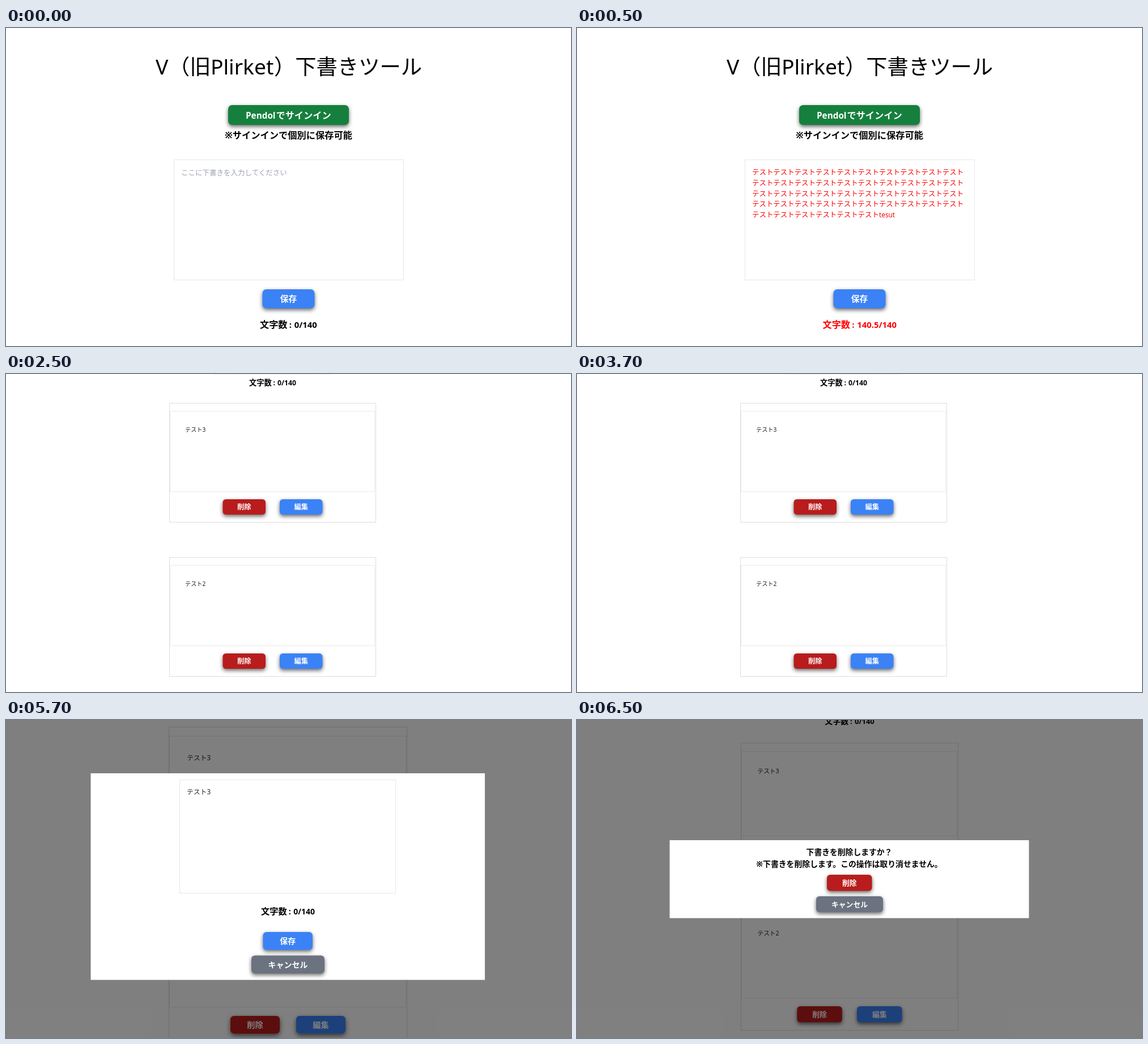
Recreate the animation shown at these times as an HTML page. Size 997x561 px, loop 8000 ms.

```html
<!DOCTYPE html>
<html lang="ja">
<head>
<meta charset="utf-8">
<title>下書きツール</title>
<style>
  html, body { margin: 0; width: 100%; height: 100%; overflow: hidden; background: #fff; }
  svg { display: block; width: 100vw; height: 100vh; }
  text { font-family: "Noto Sans", "Noto Sans CJK JP", "Noto Sans CJK", sans-serif; white-space: pre; }
  .box { fill: #fff; shape-rendering: crispEdges; vector-effect: non-scaling-stroke; }
  .btn { filter: drop-shadow(.5px 3px 3.5px rgba(0, 0, 0, .6)); }
</style>
</head>
<body>
<svg id="stage" viewBox="0 0 997 561" preserveAspectRatio="none"></svg>
<script>
const GREEN = '#15803d', BLUE = '#3b82f6', RED = '#b91c1c', GRAY = '#6b7280';
const LOOP = 8000;

// Text placed by its left (or middle) x and the vertical centre of its line.
const text = (x, cy, size, str, { fill = '#000', weight = 350, anchor = 'start' } = {}) =>
  `<text x="${x}" y="${cy + size * 0.36}" font-size="${size}" fill="${fill}" ` +
  `font-weight="${weight}" text-anchor="${anchor}">${str}</text>`;

const box = (x1, y1, x2, y2, stroke = '#e5e7eb') =>
  `<rect class="box" x="${x1}" y="${y1}" width="${x2 - x1}" height="${y2 - y1}" stroke="${stroke}"/>`;

const button = (x1, y1, x2, y2, fill, size, label = '') => {
  const r = (y2 - y1) * 0.2;
  return `<rect class="btn" x="${x1}" y="${y1}" width="${x2 - x1}" height="${y2 - y1}" rx="${r}" fill="${fill}"/>` +
    text((x1 + x2) / 2, (y1 + y2) / 2 + 0.3, size, label, { fill: '#fff', weight: 700, anchor: 'middle' });
};

const counter = (x, cy, size, value, fill = '#000') =>
  text(x, cy - 0.4, size, '文字数', { fill, weight: 700 }) +
  text(x + size * 3.2, cy, size * 0.92, ':', { fill, weight: 600 }) +
  text(x + size * 3.76, cy, size * 0.92, value + '/140', { fill, weight: 600 });

const group = (body, attrs = '') => `<g ${attrs}>${body}</g>`;

function form(body) {
  return text(264, 68.4, 37.2, 'V') +
    text(287, 68.4, 37.2, '（旧') +
    text(361, 68.4, 37.2, 'Plirket') +
    text(473, 68.4, 37.3, '）下書きツール') +
    button(392, 136, 605, 171, GREEN, 16.2) +
    text(423, 154, 15.3, 'Pendol', { fill: '#fff', weight: 600 }) +
    text(476.5, 154, 16.2, 'でサインイン', { fill: '#fff', weight: 700 }) +
    text(386, 189.5, 16.25, '※サインインで個別に保存可能', { weight: 700 }) +
    box(296.5, 232.5, 701.5, 444.5) +
    body +
    button(452.5, 461, 544.5, 494.5, BLUE, 14.7, '保存');
}

function emptyForm() {
  return form(text(309, 255, 12.5, 'ここに下書きを入力してください', { fill: '#9ca3af' })) +
    counter(448, 523.5, 16.15, '0');
}

function fullForm() {
  const red = { fill: '#f00', weight: 300 };
  let lines = '';
  for (let i = 0; i < 5; i++)
    lines += text(309, 255 + i * 18.65, 12.44, 'テスト'.repeat(i < 4 ? 10 : 6), red);
  lines += text(533, 329.9, 11.8, 'tesut', red);
  return form(lines) + counter(433.5, 523.5, 16.15, '140.5', '#f00');
}

const card = (dy, label) => group(
  box(288.5, 51.5, 652.5, 261.5, '#dedede') +
  box(289.5, 65.5, 650.5, 207.5, '#ebebeb') +
  text(316, 98.5, 10.2, label, { fill: '#222' }) +
  button(382.5, 221, 458, 248, RED, 12.3, '削除') +
  button(483, 221, 558.5, 248, BLUE, 12.3, '編集'),
  `transform="translate(0 ${dy})"`);

function list(x = 0, y = 0, zoom = 1) {
  return group(
    '<path d="M368 .5H574" stroke="#ececec" stroke-dasharray="3 2"/>' +
    counter(429, 15.5, 13.3, '0') + card(0, 'テスト3') + card(272, 'テスト2'),
    `transform="translate(${x} ${y}) scale(${zoom})"`);
}

const modal = (x1, y1, x2, y2) =>
  '<rect width="997" height="561" fill="#000" fill-opacity=".5"/>' +
  `<rect x="${x1}" y="${y1}" width="${x2 - x1}" height="${y2 - y1}" fill="#fff"/>`;

function editModal() {
  return list(-45.4, -46.9, 1.154) +
    modal(149.5, 94, 845, 458.5) +
    box(306.5, 105.5, 687.5, 305.5) +
    text(319, 126.5, 11.8, 'テスト3', { fill: '#222' }) +
    counter(450, 337.5, 15.2, '0') +
    button(453.5, 374, 541, 405.5, BLUE, 14, '保存') +
    button(433, 415.5, 562, 447, GRAY, 14, 'キャンセル');
}

function deleteModal() {
  const bold = { weight: 700, anchor: 'middle' };
  return list(-14, -13.7, 1.052) +
    modal(163.5, 212, 797.5, 349.5) +
    text(480.5, 233, 13.8, '下書きを削除しますか？', bold) +
    text(480.5, 253.7, 13.85, '※下書きを削除します。この操作は取り消せません。', bold) +
    button(441, 273, 520.5, 301.5, RED, 12.8, '削除') +
    button(422, 311, 540, 339, GRAY, 12.8, 'キャンセル');
}

const scenes = [
  [0, emptyForm()],
  [500, fullForm()],
  [2500, list()],
  [4500, editModal()],
  [6500, deleteModal()],
];

const stage = document.getElementById('stage');
stage.innerHTML = scenes.map(([, body]) => group(body, 'display="none"')).join('');
const layers = [...stage.children];
const start = performance.now();
let shown = -1;

function draw() {
  const t = Math.max(0, performance.now() - start) % LOOP;
  const now = scenes.filter(([from]) => from <= t).length - 1;
  if (now !== shown) {
    layers.forEach((layer, i) => layer.setAttribute('display', i === now ? 'inline' : 'none'));
    shown = now;
  }
  requestAnimationFrame(draw);
}
draw();
</script>
</body>
</html>
```
